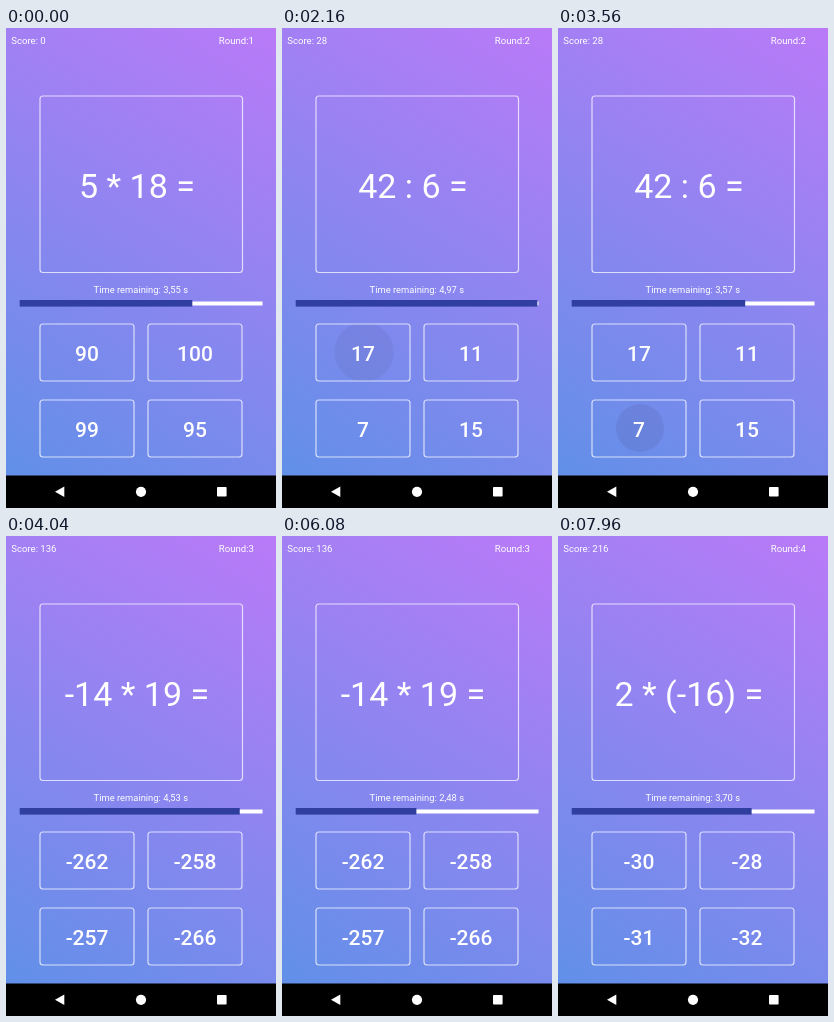
Animation, 270 px wide and 480 px high, one loop 8 s. Source, as an HTML page:

```html
<!DOCTYPE html>
<html lang="en">
<head>
<meta charset="utf-8">
<title>Mental arithmetic</title>
<style>
  html, body { margin: 0; width: 100%; height: 100%; overflow: hidden; background: #000; }
  svg { display: block; width: 270px; height: 480px; }
  text { fill: #fff; font: 9.6px Roboto, sans-serif; }
  .mid { text-anchor: middle; }
  #time { font-size: 9.4px; }
  #task { font-size: 34px; }
  .answer { font-size: 21px; font-weight: 500; }
  .box { fill: none; stroke: #fff; stroke-opacity: .72; stroke-width: 1.2; }
</style>
</head>
<body>
<svg viewBox="0 0 270 480">
  <defs>
    <linearGradient id="sky" gradientUnits="userSpaceOnUse" x1="0" y1="447" x2="270" y2="0">
      <stop offset="0" stop-color="#6190e8"/>
      <stop offset="1" stop-color="#ba7af8"/>
    </linearGradient>
    <clipPath id="press"><rect id="pressBox" width="94" height="57" rx="3"/></clipPath>
  </defs>
  <rect width="270" height="480"/>
  <rect width="270" height="447.5" fill="url(#sky)"/>

  <text id="score" x="5.2" y="16"/>
  <text id="round" x="212.8" y="16"/>
  <rect class="box" x="34" y="68" width="202.5" height="176.5" rx="3"/>
  <text id="task" class="mid" x="130.9" y="170"/>
  <text id="time" class="mid" x="134.8" y="264.7"/>
  <rect x="14" y="273.5" width="242.5" height="4" fill="#fff"/>
  <rect id="bar" x="13.7" y="272" height="6.6" fill="#303f9f"/>

  <circle id="ripple" clip-path="url(#press)" fill="#4a4a80"/>
  <g id="answers"></g>

  <g fill="#fff">
    <path d="M49 463.8L58.3 458.6V469Z"/>
    <circle cx="135" cy="463.8" r="5.1"/>
    <rect x="211" y="459" width="9.6" height="9.6" rx=".8"/>
  </g>
</svg>
<script>
const LOOP = 8000, STEP = 40, LIMIT = 5, RATE = 1.003;
const RIPPLE_LEAD = 100, RIPPLE_TIME = 250;

// pick: index of the answer tapped at the end of the round
const rounds = [
  { start: -1441, score: 0, task: '5 * 18 =', answers: [90, 100, 99, 95], pick: 0 },
  { start: 2137, score: 28, task: '42 : 6 =', answers: [17, 11, 7, 15], pick: 2 },
  { start: 3573, score: 136, task: '-14 * 19 =', answers: [-262, -258, -257, -266], pick: 3 },
  { start: 6669, score: 216, task: '2 * (-16) =', answers: [-30, -28, -31, -32] }
];

const $ = id => document.getElementById(id);
const cell = i => ({ x: 34 + (i % 2) * 108, y: 296 + (i >> 1) * 76 });
const set = (el, attrs) => {
  for (const key in attrs) el.setAttribute(key, attrs[key]);
};

$('answers').innerHTML = [0, 1, 2, 3].map(i => {
  const { x, y } = cell(i);
  return `<rect class="box" x="${x}" y="${y}" width="94" height="57" rx="3"/>
    <text class="answer mid" x="${x + 47}" y="${y + 37}"></text>`;
}).join('');
const labels = document.querySelectorAll('.answer');

function drawRipple(t) {
  const next = rounds.findIndex(r => {
    const age = t - r.start + RIPPLE_LEAD;
    return r.start > 0 && age >= 0 && age < RIPPLE_TIME;
  });
  if (next < 1) return set($('ripple'), { opacity: 0 });
  const p = (t - rounds[next].start + RIPPLE_LEAD) / RIPPLE_TIME;
  const { x, y } = cell(rounds[next - 1].pick);
  set($('pressBox'), { x, y });
  set($('ripple'), { cx: x + 48, cy: y + 28, r: 10 + 40 * p, opacity: .22 * (1 - p) });
}

function draw(t) {
  const n = rounds.findLastIndex(r => t >= r.start);
  const { start, score, task, answers } = rounds[n];
  const left = Math.max(0, LIMIT - (t - start) * RATE / 1000);
  const shown = (Math.floor(left * 100) / 100).toFixed(2).replace('.', ',');

  $('score').textContent = `Score: ${score}`;
  $('round').textContent = `Round:${n + 1}`;
  $('task').textContent = task;
  $('time').textContent = `Time remaining: ${shown} s`;
  set($('bar'), { width: 242.8 * left / LIMIT });
  labels.forEach((label, i) => label.textContent = answers[i]);
  drawRipple(t);
}

const begin = performance.now();
function tick() {
  const t = (performance.now() - begin) % LOOP;
  draw(Math.floor(t / STEP) * STEP);
  requestAnimationFrame(tick);
}
tick();
</script>
</body>
</html>
```
